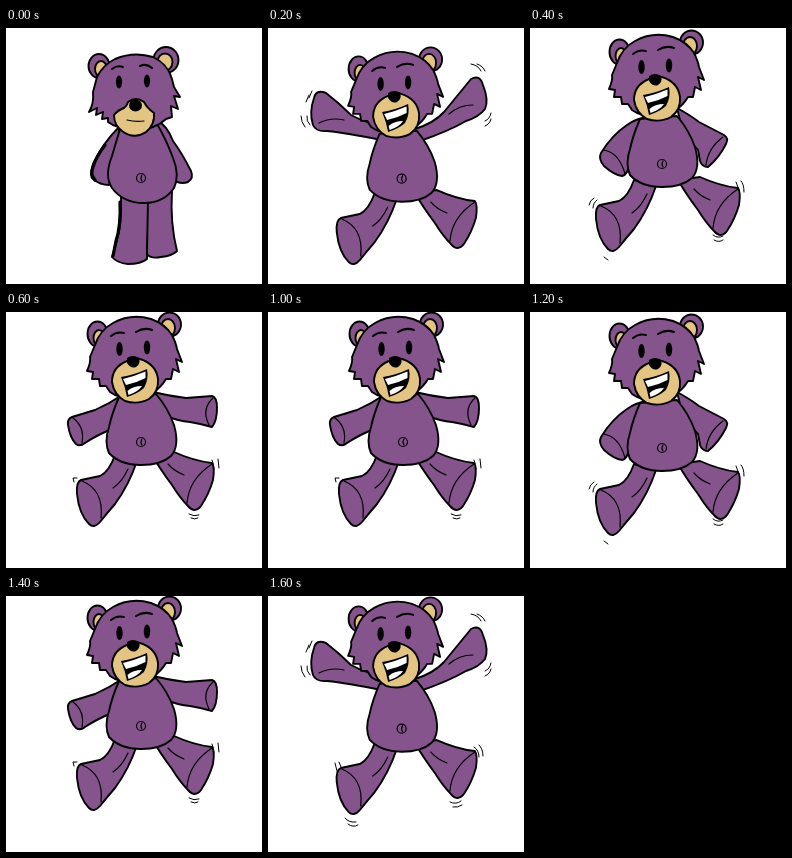
These frames come from a looping animation (256x256 px, 1.8 s). An HTML page:

```html
<!DOCTYPE html>
<html lang="en">
<head>
<meta charset="utf-8">
<title>Jumping bear</title>
<style>
  html, body { margin: 0; width: 100%; height: 100%; overflow: hidden; background: #fff; }
  svg { display: block; width: 100vw; height: 100vh; }
  path, ellipse { stroke: #000; stroke-width: 1.9; stroke-linejoin: round; stroke-linecap: round; }
  .fur { fill: #85548c; }
  .tan { fill: #e3c483; }
  .ink { fill: #000; stroke: none; }
  .white { fill: #fff; stroke: none; }
  .line { fill: none; stroke-width: 1.2; }
  .brow { fill: none; stroke-width: 2; }
  .mark { fill: none; stroke-width: 1; }
  .shade { fill: none; stroke-width: 3.2; }
</style>
</head>
<body>
<svg id="stage" viewBox="0 0 256 256"></svg>
<script>
const STEP = 200;
const path = (cls, d) => `<path class="${cls}" d="${d}"/>`;
const oval = (cls, x, y, rx, ry = rx) => `<ellipse class="${cls}" cx="${x}" cy="${y}" rx="${rx}" ry="${ry}"/>`;
const group = (html, x = 0, y = 0) => `<g transform="translate(${x} ${y})">${html}</g>`;
const button = (x, y) => oval('line', x, y, 4.5) + path('line', `M${x + 1} ${y - 3}q-2 3 0 6`);

// Resting bear
const calmHead =
  oval('fur', 93, 38, 10.5, 12) + oval('tan', 95, 41, 6, 8) +
  oval('fur', 160, 32, 12.5, 13) + oval('tan', 159, 34, 7.5, 8.5) +
  path('fur', 'M91 49Q97 37 109 31Q128 23 147 29Q162 36 166 51L168 59L174 69L168 68L172 81L165 78L166 89L160 91Q150 101 130 102Q111 101 102 94L102 90L96 91L97 84L90 87L91 80L83 84Q88 76 87 64Z') +
  path('tan', 'M122 74Q130 68 138 74Q141 80 148 85Q149 97 140 104Q128 112 116 103Q108 97 108 87Q112 82 118 80Q121 78 122 74Z') +
  oval('ink', 129.5, 77.5, 6.5, 6) +
  path('line', 'M121 92Q129 94 138 93') +
  oval('ink', 113, 54, 3.1, 6.5) + oval('ink', 141, 53, 3.1, 6.5) +
  path('brow', 'M106 41Q111 37 117 39M134 38Q140 35 146 40');

const calm =
  path('fur', 'M113 99Q97 115 87 136Q83 148 87 151Q94 157 103 157L112 130Z') +
  path('shade', 'M99 117Q90 129 87 139Q84 147 89 152') +
  path('fur', 'M151 93Q161 97 167 113Q176 125 185 143Q188 150 182 154Q174 157 166 151L155 120Z') +
  path('fur', 'M115 168Q116 195 111 212L106 229Q111 235 122 236Q135 236 141 231L143 168Z') +
  path('shade', 'M114 174Q115 198 110 213L107 228') +
  path('fur', 'M142 170L141 226Q144 231 155 229Q166 228 171 223Q164 195 166 163Z') +
  path('fur', 'M115 98Q110 114 106 128Q98 148 106 160Q117 175 138 175Q158 175 168 160Q174 147 167 130Q160 111 151 96Z') +
  button(135, 150) + calmHead;

// Jumping bear
const mouth =
  path('ink', 'M115 65Q128 63 141 57Q143 67 138 76Q131 82 121 85Q119 74 115 65Z') +
  path('white', 'M117 67Q129 64 139.5 59.5L139.5 66Q130 71 120 73Z') +
  path('white', 'M121.5 79Q127 74 136 74Q132 80 122.5 83Z');

const scaredHead =
  oval('fur', 91.5, 22, 10, 12.5) + oval('tan', 93, 26, 5.5, 8) +
  oval('fur', 163.5, 12.5, 11.5, 12) + oval('tan', 162, 16, 7, 9) +
  path('fur', 'M89 33Q94 18 107 11Q125 1 145 7Q159 12 166 23Q170 31 171 37L176 50L170 47L173 60L167 57L165 67L160 67Q150 84 128 87Q112 86 104 80L100 74L94 74L93 67L86 67L87 60L81 59Q85 50 84 45Z') +
  path('tan', 'M121 49Q127 44 134 47Q150 52 152 67Q153 80 143 87Q132 93 119 89Q108 83 106 70Q106 55 121 49Z') +
  mouth + path('ink', 'M121 46Q127 42 133 46Q135 52 130 55Q125 57 121 51Z') +
  oval('ink', 113.5, 37, 3.2, 7) + oval('ink', 141, 35.5, 3.2, 7) +
  path('brow', 'M105 24Q111 19 118 21M130 20Q138 15 146 18');

const belly = path('fur', 'M113 85Q106 101 103 115Q98 130 103 141Q114 153 135 153Q155 153 165 144Q174 134 168 113Q162 96 150 82Z') +
  button(135, 130);

const arms = {
  down:
    path('fur', 'M117 89Q105 91 97 97Q82 107 71 125Q68 131 74 138Q84 147 92 148Q98 147 100 133L110 109Z') +
    path('line', 'M73 122Q89 124 95 146') +
    path('fur', 'M147 80Q160 87 169 94L194 107Q199 110 196 116Q189 130 178 139Q172 139 170 133L168 122L154 108Z') +
    path('line', 'M176 137Q178 120 193 109'),
  mid:
    path('fur', 'M116 83Q103 92 89 98L66 105Q61 107 62 113Q64 126 70 132Q74 135 79 131Q91 123 106 117Z') +
    path('line', 'M67 106Q79 115 76 131') +
    path('fur', 'M147 80Q163 84 180 86L206 84Q211 85 211 96Q211 109 206 115Q196 112 184 110Q172 109 160 104Z') +
    path('line', 'M207 86Q195 97 203 113'),
  up:
    path('fur', 'M116 81Q98 77 83 69Q71 57 58 47Q48 43 46 52Q41 66 45 79Q48 86 59 85Q79 87 113 94Z') +
    path('line', 'M51 77Q63 71 76 74') +
    path('fur', 'M147 83Q166 77 176 66L203 33Q212 28 215 39Q221 54 217 63Q211 71 198 75Q181 85 152 95Z') +
    path('line', 'M181 68Q191 59 205 59')
};

const leftLeg =
  path('fur', 'M109 143Q103 160 94 164L75 168Q70 170 71 182Q73 202 83 212Q88 217 94 210Q102 200 109 192Q123 173 131 149Z') +
  path('line', 'M76 169Q98 178 95 206M122 157Q116 170 107 176');
const rightLeg =
  path('fur', 'M146 143Q154 157 166 173Q174 186 182 194Q189 202 195 194Q203 182 207 168Q209 155 206 151Q188 149 168 140Z') +
  path('line', 'M181 191Q183 167 206 152M162 152Q168 159 178 163');

const marks = {
  down: 'M59 177Q60 172 64 170M63 180Q63 175 67 172M206 154L209 162M211 153Q214 156 214 164M183 207Q188 211 193 208M184 212Q189 215 193 212M74 229L78 232',
  mid: 'M68 170L67 166L71 166M206 148Q208 152 208 157M212 147L213 156M183 202Q188 205 193 203M185 206Q189 208 192 206',
  hands: 'M41 52L44 45M38 56L41 49M33 70Q33 76 37 81M39 70Q38 75 42 79M203 18Q210 19 213 25M209 18Q215 20 217 25M217 75Q222 73 223 67M217 80Q222 78 223 73',
  feet: 'M67 167L69 175M71 166L73 171M77 222Q81 227 88 226M80 228Q85 232 90 229M206 151Q211 154 211 161M211 149Q215 153 215 160M182 206Q188 209 193 205M185 211Q190 212 194 209'
};

// sag: how far the body and legs hang below the mid-air pose, 0 to 1
const jumper = (pose, sag, lines, dy = 0) => group(
  arms[pose] +
  group(leftLeg, -5 * sag, 9 * sag) +
  group(rightLeg, 2 * sag, 9 * sag) +
  group(belly, -3 * sag, 6 * sag) +
  group(scaredHead, -2 * sag, 2 * sag) +
  path('mark', lines), 0, dy);

const poses = {
  calm,
  crouch: jumper('up', 0.45, marks.hands, 18),
  down: jumper('down', 1, marks.down),
  mid: jumper('mid', 0, marks.mid),
  up: jumper('up', 0.45, marks.hands + marks.feet)
};
const order = ['calm', 'crouch', 'down', 'mid', 'up', 'mid', 'down', 'mid', 'up'];

const stage = document.getElementById('stage');
stage.innerHTML = Object.entries(poses).map(([id, art]) => `<g id="${id}">${art}</g>`).join('');
const layers = [...stage.children];

function draw() {
  const now = order[Math.floor(performance.now() / STEP) % order.length];
  for (const layer of layers) layer.style.display = layer.id === now ? '' : 'none';
  requestAnimationFrame(draw);
}
draw();
</script>
</body>
</html>
```
